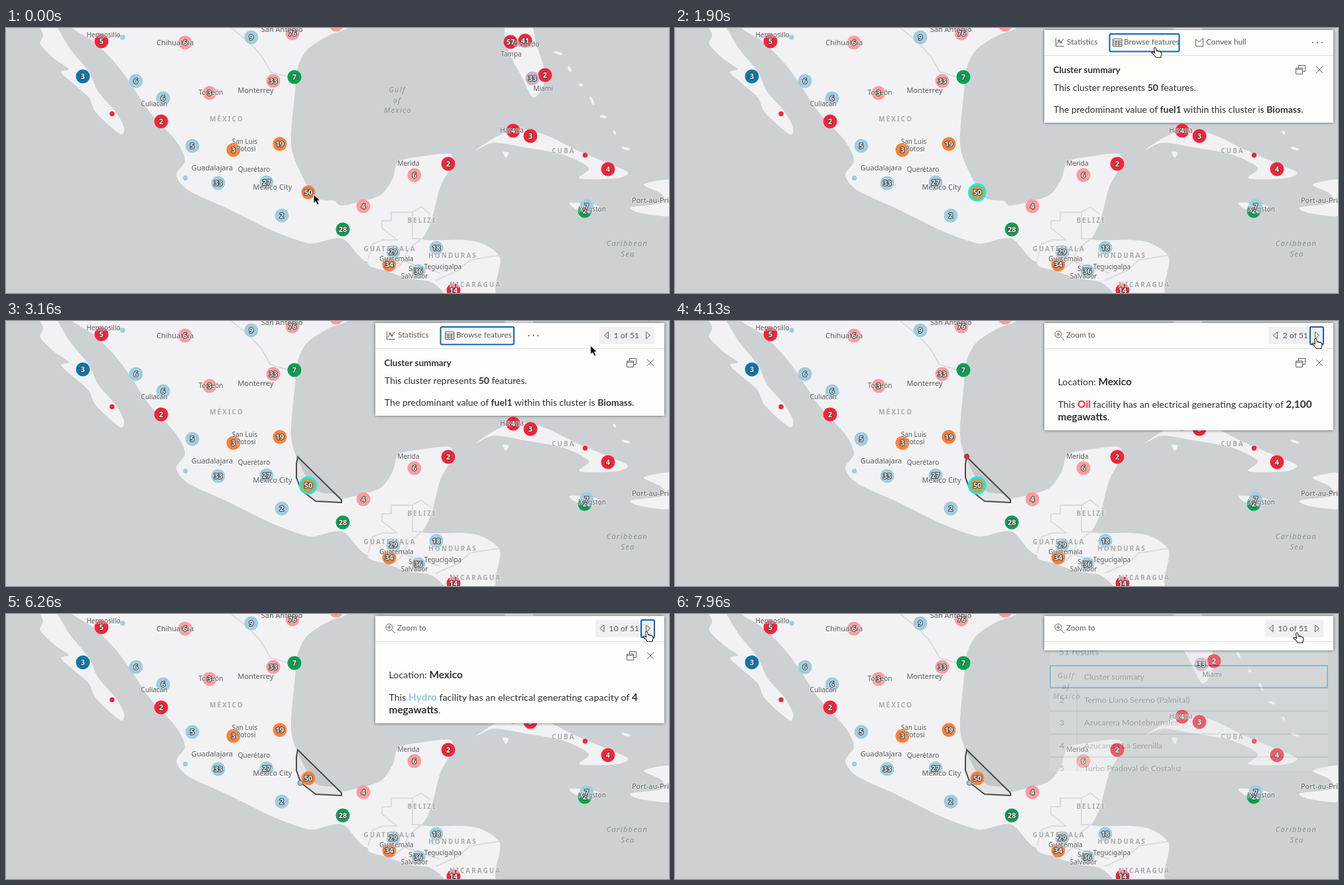
An HTML page for the animation above (8 s loop, 1000 px wide and 400 px high).

```html
<!DOCTYPE html>
<html lang="en">
<head>
<meta charset="utf-8">
<title>Cluster popup on a map</title>
<style>
html, body { margin: 0; width: 100%; height: 100%; overflow: hidden; background: #cdd1d3; }
svg { display: block; width: 100%; height: 100%; }

.land { fill: #f2f2f4; }
.border { fill: none; stroke: #dcdcde; stroke-width: 2; stroke-linejoin: round; }
.label { font: 10px "Noto Sans", "Open Sans", sans-serif; fill: #5c5c5e; text-anchor: middle;
  stroke: #f2f2f4; stroke-opacity: .7; stroke-width: 1.5; paint-order: stroke; }
.label.big { font-size: 11px; }
.label.country { font-weight: 600; letter-spacing: 2px; fill: #a9abad; }
.label.sea { font-size: 11px; font-style: italic; letter-spacing: 1.3px; fill: #8b9194; stroke: none; }
.count { font: bold 11px "Noto Sans", "Open Sans", sans-serif; fill: #ececec; text-anchor: middle;
  stroke: #4a4a4a; stroke-width: 2.2; stroke-linejoin: round; paint-order: stroke; }

.ui text, .list text { font: 14px Lato, "Open Sans", sans-serif; fill: #323232; }
.ui .bar text { font-size: 11.8px; fill: #5a5a5a; }
.ui .title { font-size: 13.5px; font-weight: bold; }
.ui .info { font-size: 14.3px; }
.ui tspan { font-weight: bold; }
.ui .info tspan { font-size: 15.4px; }
.ui .num { font-size: 12.3px; fill: #5a5a5a; text-anchor: end; }
.icon { fill: none; stroke: #5f5f5f; stroke-width: 1; }
.ring { fill: none; stroke: #0f62bd; stroke-width: 2; }
.pane { fill: #fdfdfc; filter: drop-shadow(0 0 2px rgba(0, 0, 0, .6)); }
.list text { font-size: 12.3px; }

/* One 8 s loop; windows switch hard. */
.ui, .pane, .mark, .hull, .first, .focus, .paged, .summary, .detail, .zoom, .wide, .arrow, .hand
  { animation: 8s step-end infinite; }
.ui { animation-name: open; }
.pane { animation-name: size; }
.mark { animation-name: mark; }
.hull { animation-name: hull; }
.first { animation-name: first; }
.focus { animation-name: focus; }
.paged { animation-name: paged; }
.summary { animation-name: summary; }
.detail { animation-name: detail; }
.zoom { animation-name: zoom; }
.wide { animation-name: wide; }
.arrow { animation-name: arrow; }
.hand { animation-name: hand; }
.cursor { animation: move 8s ease-in-out infinite; }
.list { animation: list 8s linear infinite; }
.page { opacity: 0; animation: page 8s step-end var(--at) infinite; }
.page.last { animation-name: last; }
.page .title { animation: fade 8s linear var(--at) infinite; }

@keyframes open { 0% { opacity: 0 } 3.5%, to { opacity: 1 } }
@keyframes size { 0% { height: 140px } 50.75% { height: 162px } 98.125%, to { height: 52px } }
@keyframes mark { 0% { opacity: 0 } 3.5% { opacity: 1 } 52.5%, to { opacity: 0 } }
@keyframes hull { 0% { opacity: 0 } 25.375%, to { opacity: 1 } }
@keyframes first { 0% { opacity: 1 } 25.375%, to { opacity: 0 } }
@keyframes focus { 0% { opacity: 0 } 23.75% { opacity: 1 } 25.375%, to { opacity: 0 } }
@keyframes paged { 0% { opacity: 0 } 25.375% { opacity: 1 } 50.75%, to { opacity: 0 } }
@keyframes summary { 0% { opacity: 1 } 50.75%, to { opacity: 0 } }
@keyframes detail { 0% { opacity: 0 } 50.75% { opacity: 1 } 98.125%, to { opacity: 0 } }
@keyframes zoom { 0% { opacity: 0 } 50.75%, to { opacity: 1 } }
@keyframes wide { 0% { transform: none } 77.55%, to { transform: translateX(-6.5px) } }
@keyframes arrow { 0% { opacity: 1 } 15.5% { opacity: 0 } 28.5% { opacity: 1 } 42%, to { opacity: 0 } }
@keyframes hand { 0% { opacity: 0 } 15.5% { opacity: 1 } 28.5% { opacity: 0 } 42%, to { opacity: 1 } }
@keyframes move {
  0%, 4.5% { transform: translate(464px, 251px) }
  12.5%, 12.875% { transform: translate(742px, 95px) }
  17.875%, 27.5% { transform: translate(724px, 29px) }
  31.25% { transform: translate(800px, 45px) }
  35.375%, 39.5% { transform: translate(881.5px, 37px) }
  46.25%, 92.875% { transform: translate(966px, 26px) }
  97%, to { transform: translate(938px, 28px) }
}
@keyframes list { 0%, 98.125% { opacity: 0 } to { opacity: .4 } }
@keyframes page { 0% { opacity: 1 } 3.35%, to { opacity: 0 } }
@keyframes last { 0% { opacity: 1 } 22.45%, to { opacity: 0 } }
@keyframes fade { 0%, 1.25% { opacity: 0 } 5.7%, to { opacity: 1 } }
</style>
</head>
<body>
<svg viewBox="0 0 1000 400" preserveAspectRatio="none">
  <rect width="1000" height="400" fill="#cdd1d3"/>
  <g id="land" class="land"></g>
  <path class="border" d="M340 0L367 22 386 43 399 66 436 77"/>
  <path class="border" d="M546 350L553 326 568 320H590L567 302V291H581V278H613V318M613 278L626 270 640 281"/>
  <path class="border" d="M612 318H627L606 335 600 352 585 365M600 352L655 370M648 381L682 366 700 350 745 343"/>

  <path class="hull" d="M440 205L506 270V274L467 272 445 255 438 236V216Z" fill="rgba(150,150,150,.15)" stroke="#4a4a4a" stroke-width="2"/>
  <g id="circles"></g>
  <circle class="mark" cx="455.8" cy="248.3" r="12.3" fill="#c6a04c" stroke="#08f0ee" stroke-width="3"/>
  <g id="labels"></g>
  <g id="counts"></g>
  <g id="dots"></g>

  <g class="list">
    <rect x="565" y="40" width="420" height="197" fill="#dfe4e0"/>
    <g id="rows" clip-path="url(#view)"></g>
    <rect x="566" y="78" width="418" height="33" fill="none" stroke="#007ac2" stroke-width="2"/>
  </g>
  <clipPath id="view"><rect x="565" y="40" width="420" height="197"/></clipPath>

  <g class="ui">
    <rect class="pane" x="557" y="3" width="436" height="140"/>
    <path d="M557 41.5H993" stroke="#dedede"/>

    <g class="bar summary">
      <path class="icon" d="M574.5 15V27.5H587M576 25L579 19 582 22 586 16M578 18h2v2h-2zM581 21h2v2h-2z"/>
      <text x="591" y="25">Statistics</text>
      <g class="first">
        <use href="#table" x="660"/>
        <text x="677" y="25">Browse features</text>
        <path class="icon" d="M785.5 27.5V17L790 21 796.5 15.5V27.5Z"/>
        <text x="801" y="25">Convex hull</text>
        <use href="#more" x="969"/>
        <rect class="ring focus" x="655.5" y="9" width="105" height="26.5" rx="2"/>
      </g>
      <g class="paged">
        <use href="#table" x="662"/>
        <text x="679" y="25">Browse features</text>
        <use href="#more" x="795.5"/>
        <rect class="ring" x="655.5" y="9" width="110.5" height="26.5" rx="2"/>
      </g>
    </g>

    <g class="bar zoom">
      <path class="icon" d="M581.5 23.5L587 29M578 17V23M575 20H581"/>
      <circle class="icon" cx="578" cy="20" r="5"/>
      <text x="590" y="25">Zoom to</text>
    </g>

    <g class="hull">
      <rect x="895.5" y="9" width="83" height="26" fill="#f0f0f2"/>
      <g class="wide">
        <rect x="895.5" y="9" width="12" height="26" fill="#f0f0f2"/>
        <path class="icon" d="M908.5 16.5V27L902.5 21.7Z"/>
      </g>
      <path class="icon" d="M965.5 16.5V27L971.5 21.7Z"/>
      <text class="num paged" x="955" y="26">1 of 51</text>
      <g id="nums"></g>
      <rect class="ring detail" x="958" y="9" width="20" height="26.5" rx="2"/>
    </g>

    <g class="summary">
      <use href="#tools"/>
      <text class="title" x="570.5" y="68">Cluster summary</text>
      <text x="571" y="95">This cluster represents <tspan>50</tspan> features.</text>
      <text x="571" y="128">The predominant value of <tspan>fuel1</tspan> within this cluster is <tspan>Biomass</tspan>.</text>
    </g>
    <g class="detail">
      <use href="#tools"/>
      <text class="info" x="577.5" y="97">Location: <tspan>Mexico</tspan></text>
      <g id="details"></g>
      <text class="info" x="577.5" y="149.5"><tspan>megawatts</tspan>.</text>
    </g>
  </g>

  <g class="cursor">
    <path class="arrow" d="M0 0V13.5L3.2 10.7 5.6 16 8.2 14.8 5.8 9.7H10Z" stroke="#fff"/>
    <path class="hand" d="M-1.5 1.5Q0 -1 1.5 1.5L2.5 6 4 5 5.5 6.5 7 5.8 8 7.3H9.5L10 11 8.5 15.5H1.5L-2 11 -5 8.5Q-4.5 6.5 -2 7.8L-.3 9Z" fill="#fff" stroke="#222" stroke-width="1.1" stroke-linejoin="round"/>
  </g>

  <defs>
    <path id="table" class="icon" d="M.5 16.5H14V27.5H.5ZM.5 19.5H14M.5 22H14M.5 24.7H14M5 19.5V27.5M9.5 19.5V27.5"/>
    <path id="more" d="M-7 22h.01M0 22h.01M7 22h.01" stroke="#5f5f5f" stroke-width="2" stroke-linecap="round"/>
    <path id="tools" class="icon" d="M940.5 60V56.5H950.5V65.5H946.5M936.5 60.5H946.5V69.5H936.5ZM936.5 62.5H946.5M967 58L977 68M977 58L967 68"/>
  </defs>
</svg>

<script>
const color = { red: '#fb2236', pink: '#ff9c9f', sky: '#9fcde0', orange: '#ff8038', green: '#02a14f', blue: '#0877ad', mauve: '#cbb2ce' };
const fuel = { Oil: color.red, Biomass: color.orange, Hydro: '#93c8df' };
const add = (id, markup) => document.getElementById(id).insertAdjacentHTML('beforeend', markup);

// Closed smooth curve through the given points
function coast(text) {
  const pts = text.split(' ').map(p => p.split(',').map(Number));
  const at = i => pts[(i + pts.length) % pts.length];
  const lean = (i, dir) => at(i).map((v, k) => v + dir * (at(i + 1)[k] - at(i - 1)[k]) / 7);
  const d = pts.map((_, i) => `C${lean(i, 1)} ${lean(i + 1, -1)} ${at(i + 1)}`).join('');
  add('land', `<path d="M${pts[0]}${d}Z"/>`);
}
const mexicoWest = '90,-20 100,0 133,21 164,52 186,81 216,126 256,170 270,200 257,222 275,245 335,273 400,305 445,322 465,325 508,318 546,353';
const mexicoEast = '610,335 638,300 655,240 672,208 669,190 625,194 592,202 583,228 565,252 535,262 505,268 495,261 468,256 445,220 430,175 436,95 440,60 455,32 487,11 515,0 520,-20';
coast(mexicoWest + ' ' + mexicoEast);
coast('546,353 575,367 608,378 640,383 661,400 670,420 735,420 738,388 745,347 720,326 690,320 627,319 600,300');
coast('45,-15 56,10 52,25 75,48 95,62 83,67 105,87 125,105 136,128 172,160 178,150 165,126 139,96 125,66 97,32 78,0 70,-15');
coast('758,-10 752,7 760,40 775,68 794,104 806,95 814,70 800,25 790,-10');
coast('708,185 740,164 775,153 815,162 860,184 905,203 938,218 920,227 865,227 879,211 840,191 781,180 736,173');
coast('850,264 885,266 896,272 866,276');
coast('1010,231 962,236 988,250 990,264 942,271 960,280 1010,281');
coast('749,187 758,188 754,196');

// Island chain
for (let i = 0; i < 7; i++) {
  const x = 833 + 17 * i, y = 38 + 24 * i;
  add('land', `<ellipse cx="${x}" cy="${y}" rx="${7 - i % 3 * 2}" ry="2" transform="rotate(${i % 2 ? 65 : 15} ${x} ${y})"/>`);
}

// Each entry: count, x, y
function cluster(c, list) {
  for (const item of list.split(', ')) {
    const [n, x, y] = item.split(' ');
    add('circles', `<circle cx="${x}" cy="${y}" r="10.5" fill="${color[c]}"/>`);
    add('counts', `<text class="count" x="${x}" y="${+y + 4}">${n}</text>`);
  }
}
const point = (c, x, y) => add('circles', `<circle cx="${x}" cy="${y}" r="3.7" fill="${color[c]}"/>`);

cluster('red', '5 144 20, 2 234 141, 2 667 205, 14 675 396, 57 761 21, 41 783 19, 2 813 71, 4 765 155, 3 791 163, 4 908 213');
cluster('green', '7 435 74, 28 508 304, 2 873 276');
cluster('pink', '6 270 22, 76 432 8, 3 307 98, 33 403 80, 4 539 269, 6 616 222');
cluster('pink', '8 498 -5');
cluster('sky', '9 370 14, 6 196 80, 6 237 106, 5 281 178, 33 320 234, 27 393 233, 2 416 283, 29 584 338, 18 649 332, 36 622 367, 7 876 269');
cluster('orange', '3 343 184, 19 413 175, 50 456 248, 34 578 357');
cluster('blue', '3 116 73');
cluster('mauve', '33 794 76');
point('red', 160, 129.5);
point('red', 873.5, 192);
point('sky', 270.5, 226.5);
point('sky', 176, 14);

function label(kind, list) {
  for (const item of list.split(', ')) {
    const [, name, x, y] = item.match(/(.+) (\S+) (\S+)/);
    add('labels', `<text class="label ${kind}" x="${x}" y="${y}">${name}</text>`);
  }
}
label('town', 'Hermosillo 147 14, Culiacan 223.5 118, Torreón 309 101, San Luis 360 175, Potosi 362 186, Querétaro 374 217, Merida 607 208');
label('town', 'Guatemala 589 352, San 616 367, Salvador 616 378, Tegucigalpa 659 364');
label('town', 'Tampa 762 43, Orlando 785 28, Miami 810 95, Havana 763 158, Kingston 884 277');
label('big', 'Chihuahua 255 26, San Antonio 416 6, Monterrey 376.5 98, Guadalajara 311 215, Mexico City 402 244, Port-au-Prince 981 264');
label('country', 'MÉXICO 333 141, CUBA 841 189, BELIZE 628 294, GUATEMALA 579 337, HONDURAS 674 347, NICARAGUA 708 391');
label('sea', 'Gulf 590 97, of 590 113, Mexico 591 128, Caribbean 937 329, Sea 938 345');

const pages = [
  ['Termo Llano Sereno (Palmital)', 'Oil', '2,100', 440, 204.5],
  ['Azucarera Montebrumales', 'Biomass', '12', 452, 246],
  ['Azucarera La Serenilla', 'Biomass', '8', 447, 251],
  ['Turbo Pradoval de Costaluz', 'Biomass', '30', 459, 263],
  ['Central Tazumbalco', 'Biomass', '20', 453, 259],
  ['Central Valdecaña', 'Biomass', '10', 457, 262],
  ['Central Sierraluz', 'Biomass', '15', 464, 268],
  ['Planta Aguaverdina', 'Hydro', '26', 470, 269],
  ['Central Hidráulica Montelucero', 'Hydro', '4', 444, 255]
];
pages.forEach(([title, kind, power, x, y], i) => {
  const attrs = `class="page${i === pages.length - 1 ? ' last' : ''}" style="--at:${4060 + 268 * i}ms"`;
  add('dots', `<g ${attrs}><circle cx="${x}" cy="${y}" r="3.8" fill="${fuel[kind]}" stroke="#555" stroke-width=".8"/></g>`);
  add('nums', `<g ${attrs}><text class="num" x="955" y="26">${i + 2} of 51</text></g>`);
  add('details', `<g ${attrs}><text class="title" x="570.5" y="68">${title}</text>
    <text class="info" x="577.5" y="131">This <tspan style="fill:${fuel[kind]}">${kind}</tspan>
    facility has an electrical generating capacity of <tspan>${power}</tspan></text></g>`);
});

add('rows', '<text x="579" y="62" style="font-size:14px">51 results</text><path d="M606.5 112V237" stroke="#aab2ae"/>');
['Cluster summary', ...pages.slice(0, 4).map(p => p[0])].forEach((name, i) => {
  const y = 99 + 34.6 * i;
  add('rows', `<text x="580" y="${y}">${i ? i + 1 : ''}</text><text x="617" y="${y}">${name}</text>
    <path d="M565 ${y + 13}H985" stroke="#8f9894" stroke-width="1.5"/>`);
});
</script>
</body>
</html>
```
